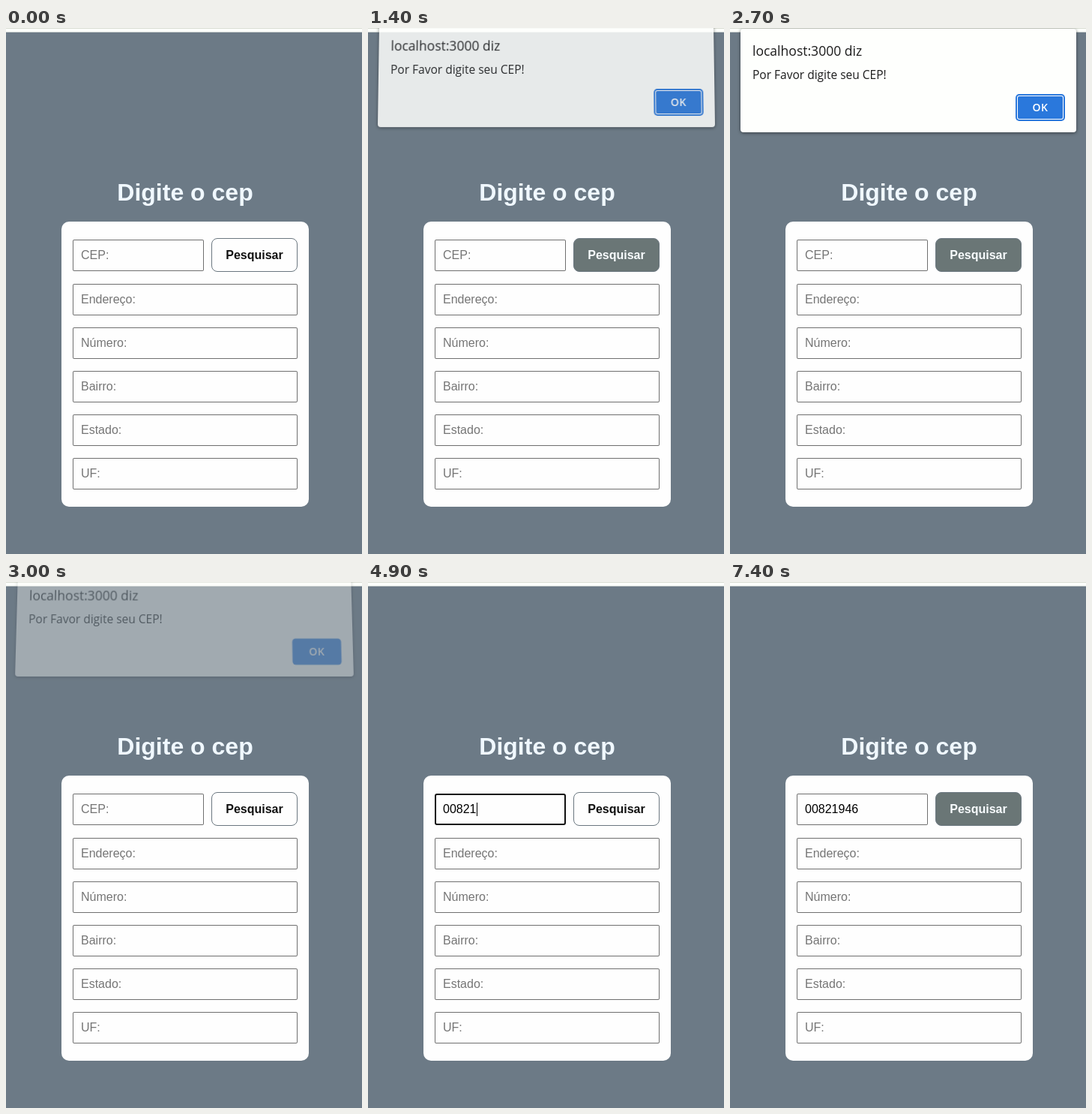
Recreate the animation shown at these times as an HTML page. Size 475x701 px, loop 8 s.

```html
<!DOCTYPE html>
<html lang="pt-BR">
<head>
<meta charset="utf-8">
<title>Digite o cep</title>
<style>
  * { box-sizing: border-box; }
  html, body { margin: 0; width: 100%; height: 100%; overflow: hidden; }
  body { position: relative; background: #6c7a86; font: 16px "Liberation Sans", Arial, sans-serif; }
  body div { position: absolute; white-space: nowrap; }
  #strip { left: 0; top: 0; width: 100%; height: 6px; background: #fcfefb; border-top: 1px solid #d9ddd3; border-bottom: 1px solid #c3cac9; }
  #title { left: 74px; top: 201px; width: 330px; font-weight: bold; font-size: 32px; line-height: 36px; text-align: center; color: #f0f8ff; }
  #card { left: 74px; top: 258px; width: 330px; height: 380px; border-radius: 10px; background: #fefefe; }
  .field { left: 89px; width: 300px; height: 42px; padding: 1px 11px; line-height: 40px; border-radius: 2px; color: #757575; background: #fefefe; box-shadow: inset 0 0 0 1px #6f6f6f; }
  .field.focus { border-radius: 3px; box-shadow: inset 0 0 0 2px #101010; }
  .field.filled { color: #000; }
  #caret { top: 12px; width: 1px; height: 18px; background: #000; }
  #search { left: 274px; top: 280px; width: 115px; height: 45px; border: 1px solid #6b7780; border-radius: 8px; line-height: 43px; text-align: center; font-weight: bold; }
  #list { left: 155px; top: 333px; width: 120px; padding: 4px 12px; border-radius: 2px; background: #fefefe; box-shadow: 0 1px 3px rgba(0,0,0,.32); font: 15.7px/36px "Open Sans", "Noto Sans", sans-serif; color: #161616; }
  #list::before { content: ""; position: absolute; left: 15px; top: -6px; width: 14px; height: 14px; background: #fefefe; border: solid #e2e2e2; border-width: 1px 0 0 1px; transform: rotate(45deg); }
  #list div { position: relative; height: 36px; }
  #dialog { left: 14px; top: 1px; width: 448px; height: 138px; border-radius: 4px; background: #fefffd; box-shadow: 0 1px 4px rgba(0,0,0,.5); font-family: "Open Sans", "Noto Sans", sans-serif; color: #1c1c1c; }
  #host { left: 16px; top: 17px; font-size: 17.55px; line-height: 24px; }
  #message { left: 16px; top: 49px; font-size: 15.5px; line-height: 24px; }
  #ok { left: 370px; top: 90px; width: 60px; height: 30px; border-radius: 2px; background: #2a78dc; color: #fff; font-weight: 600; font-size: 14px; line-height: 30px; letter-spacing: .5px; text-align: center; }
</style>
</head>
<body>
<div id="strip"></div>
<div id="title">Digite o cep</div>
<div id="card"></div>
<div id="cep" class="field" style="top:282px;width:175px"><span id="value"></span><div id="caret"></div></div>
<div id="search">Pesquisar</div>
<div id="list"></div>
<div id="dialog">
  <div id="host">localhost:3000 diz</div>
  <div id="message">Por Favor digite seu CEP!</div>
  <div id="ok">OK</div>
</div>
<script>
  const LOOP = 8000, STEP = 100;
  const CODE = '00821946';
  const KEY_TIMES = [3900, 4300, 4500, 4700, 4900, 5600, 6000, 6200];
  const HISTORY = ['00527-180', '00527-340', '90909041', '846209', '00527-610', '00527-930'];
  const el = id => document.getElementById(id);
  const clamp = v => Math.max(0, Math.min(1, v));
  const ramp = (t, a, b) => clamp((t - a) / (b - a));
  const mix = (a, b, k) => `rgb(${a.map((v, i) => Math.round(v + (b[i] - v) * k))})`;
  const typed = t => CODE.slice(0, KEY_TIMES.filter(k => k <= t).length);

  ['Endereço:', 'Número:', 'Bairro:', 'Estado:', 'UF:'].forEach((label, i) => {
    const field = document.createElement('div');
    field.className = 'field';
    field.style.top = 341 + 58 * i + 'px';
    field.textContent = label;
    el('card').after(field);
  });

  const rows = HISTORY.map(text => {
    const row = document.createElement('div');
    row.textContent = text;
    el('list').append(row);
    return row;
  });

  function drawField(t) {
    const text = typed(t);
    const focus = t >= 3500 && t < 7400;
    el('value').textContent = text || 'CEP:';
    el('cep').classList.toggle('focus', focus);
    el('cep').classList.toggle('filled', text !== '');
    el('caret').style.left = 11 + text.length * 8.9 + 'px';
    el('caret').style.opacity = focus && t < 6700 ? 1 : 0;
  }

  function drawSearch(t) {
    const hover = ramp(t, 50, 250) - ramp(t, 2750, 2950) + ramp(t, 6640, 6800);
    el('search').style.background = mix([254, 254, 254], [106, 118, 118], hover);
    el('search').style.color = mix([17, 17, 17], [248, 252, 254], hover);
  }

  function drawList(t) {
    const query = typed(t - STEP).slice(0, 2);
    rows.forEach((row, i) => row.style.display = HISTORY[i].startsWith(query) ? '' : 'none');
    el('list').style.opacity = ramp(t, 3400, 3600) - ramp(t, 4500, 4700);
  }

  // The dialog swings down from the window's top edge and back up.
  function drawDialog(t) {
    const open = ramp(t, 1335, 1435) - ramp(t, 2740, 3140);
    const away = 1 - open;
    el('dialog').style.opacity = clamp(1.6 * open - .2);
    el('dialog').style.transform = away
      ? `perspective(1000px) translateY(${-20 * away}px) rotateX(${11 * away}deg)` : 'none';
    el('ok').style.boxShadow = t < 2800
      ? '0 0 0 1px #fff, 0 0 0 3px #2a78dc' : '0 0 0 2.5px #2a78dc';
  }

  function frame(now) {
    const t = Math.floor(now % LOOP / STEP) * STEP;
    drawField(t);
    drawSearch(t);
    drawList(t);
    drawDialog(t);
    requestAnimationFrame(frame);
  }
  frame(0);
</script>
</body>
</html>
```
